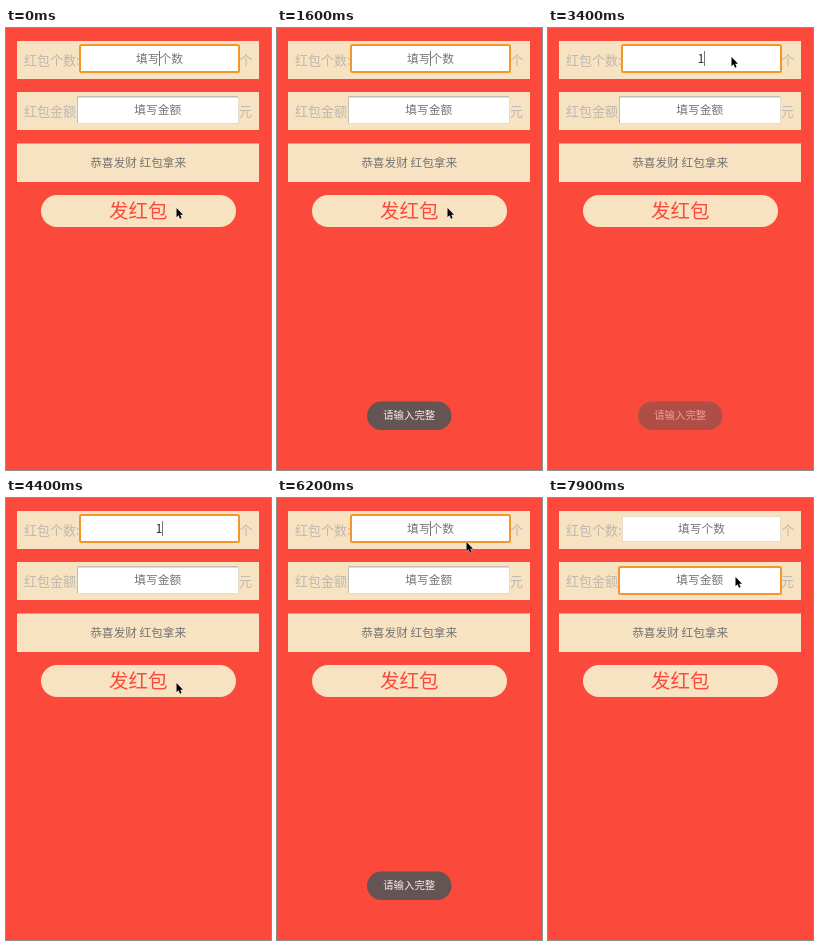
An HTML page for the animation above (8000 ms loop, 265x442 px).

```html
<!DOCTYPE html>
<html lang="zh">
<head>
<meta charset="utf-8">
<title>发红包</title>
<style>
html, body { margin: 0; width: 100%; height: 100%; overflow: hidden; background: #fb493b; }
svg { display: block; width: 100%; height: 100%; }
text { font: 11.7px "Noto Sans CJK SC", "Noto Sans CJK", sans-serif; text-anchor: middle; fill: #757575; }
.card { fill: #f7e2c1; }
.label { font-size: 13px; text-anchor: start; fill: #bdb8b0; }
.send { font-size: 19.5px; fill: #fb493b; }
.toast text { font-size: 10.4px; fill: #f4f0f0; }
.value { fill: #222; }
.field { fill: #fff; stroke: #e6dccb; }
.shade { fill: none; stroke: #c3bdb2; }
.ring { fill: #fff; stroke: #f4962a; stroke-width: 2; }

.blink, .place, .typed, .empty, .first, .second, .toast, .pointer { animation: 8s step-end infinite; }
.blink { animation-name: blink; }
.place { animation-name: place; }
.typed { animation-name: typed; }
.empty { animation-name: empty; }
.first { animation-name: first; }
.second { animation-name: second; }
.toast { animation-name: toast; }
.pointer { animation-name: pointer; }

@keyframes blink {
  0%, 7.5%, 20%, 32.5%, 42.5%, 55%, 67.5%, 77.5%, 90% { opacity: 1; }
  2.5%, 13.75%, 26.25%, 38.75%, 48.75%, 61.25%, 73.75%, 83.75%, 98.75%, 100% { opacity: 0; }
}
@keyframes place {
  0%, 77.5% { transform: translate(153px, 23px); }
  42.5% { transform: translate(156px, 23px); }
  92.5%, 100% { transform: translate(151px, 74px); }
}
@keyframes typed { 0%, 77.5%, 100% { opacity: 0; } 42.5% { opacity: 1; } }
@keyframes empty { 0%, 77.5%, 100% { opacity: 1; } 42.5% { opacity: 0; } }
@keyframes first { 0% { opacity: 1; } 92.5%, 100% { opacity: 0; } }
@keyframes second { 0% { opacity: 0; } 92.5%, 100% { opacity: 1; } }
@keyframes toast {
  0%, 46.25%, 90%, 100% { opacity: 0; }
  12.5%, 57.5% { opacity: 0; animation-timing-function: steps(6); }
  20%, 65% { opacity: 1; }
  38.75%, 82.5% { opacity: 1; animation-timing-function: steps(6); }
}
@keyframes pointer {
  0% { transform: translate(170px, 180px); }
  21.25% { transform: translate(170px, 180px); animation-timing-function: steps(4); }
  26.25% { transform: translate(195px, 95px); animation-timing-function: steps(4); }
  31.25% { transform: translate(187px, 36px); animation-timing-function: steps(2); }
  33.75% { transform: translate(183px, 29px); }
  42.5% { transform: translate(183px, 29px); animation-timing-function: steps(5); }
  48.75% { transform: translate(169px, 199px); }
  50% { transform: translate(169px, 199px); animation-timing-function: steps(2); }
  52.5% { transform: translate(170px, 185px); }
  60% { transform: translate(170px, 185px); animation-timing-function: steps(6); }
  67.5% { transform: translate(190px, 65px); animation-timing-function: steps(5); }
  73.75% { transform: translate(189px, 44px); }
  87.5% { transform: translate(189px, 44px); animation-timing-function: steps(4); }
  92.5%, 100% { transform: translate(187px, 79px); }
}
</style>
</head>
<body>
<svg viewBox="0 0 265 442">
  <g class="card">
    <rect x="11" y="13" width="242" height="38"/>
    <rect x="11" y="64" width="242" height="38"/>
    <rect x="11" y="115.5" width="242" height="38.5"/>
    <rect x="35" y="167" width="195" height="32" rx="16"/>
  </g>

  <text class="label" x="18" y="37">红包个数:</text>
  <text class="label" x="233.5" y="37">个</text>
  <text class="label" x="18" y="88">红包金额</text>
  <text class="label" x="233" y="88">元</text>

  <rect class="field" x="74.5" y="18.5" width="158" height="25"/>
  <rect class="ring first" x="74" y="17" width="159" height="27" rx="1.5"/>
  <text class="empty" x="153.5" y="35.2">填写个数</text>
  <text class="value typed" x="153" y="35.2">1</text>

  <rect class="field" x="71.5" y="69.5" width="161" height="26"/>
  <path class="shade" d="M71.5 95V68.5H232"/>
  <rect class="ring second" x="71" y="69" width="162" height="27" rx="1.5"/>
  <text x="151.7" y="86.4">填写金额</text>

  <g class="place"><rect class="blink" width="1" height="15" fill="#777"/></g>

  <text x="132.2" y="139.4">恭喜发财 红包拿来</text>
  <text class="send" x="132.2" y="190.2">发红包</text>

  <g class="toast">
    <rect x="90" y="373.5" width="84.5" height="28.5" rx="14.25" fill="#645453"/>
    <text x="132.2" y="391.2">请输入完整</text>
  </g>

  <g class="pointer">
    <path d="M.5 0V9.2L2.6 7.3 4 10.8 5.6 10.1 4.2 6.8H7Z" fill="#000" stroke="#fff" stroke-width=".6" paint-order="stroke"/>
  </g>
</svg>
</body>
</html>
```
